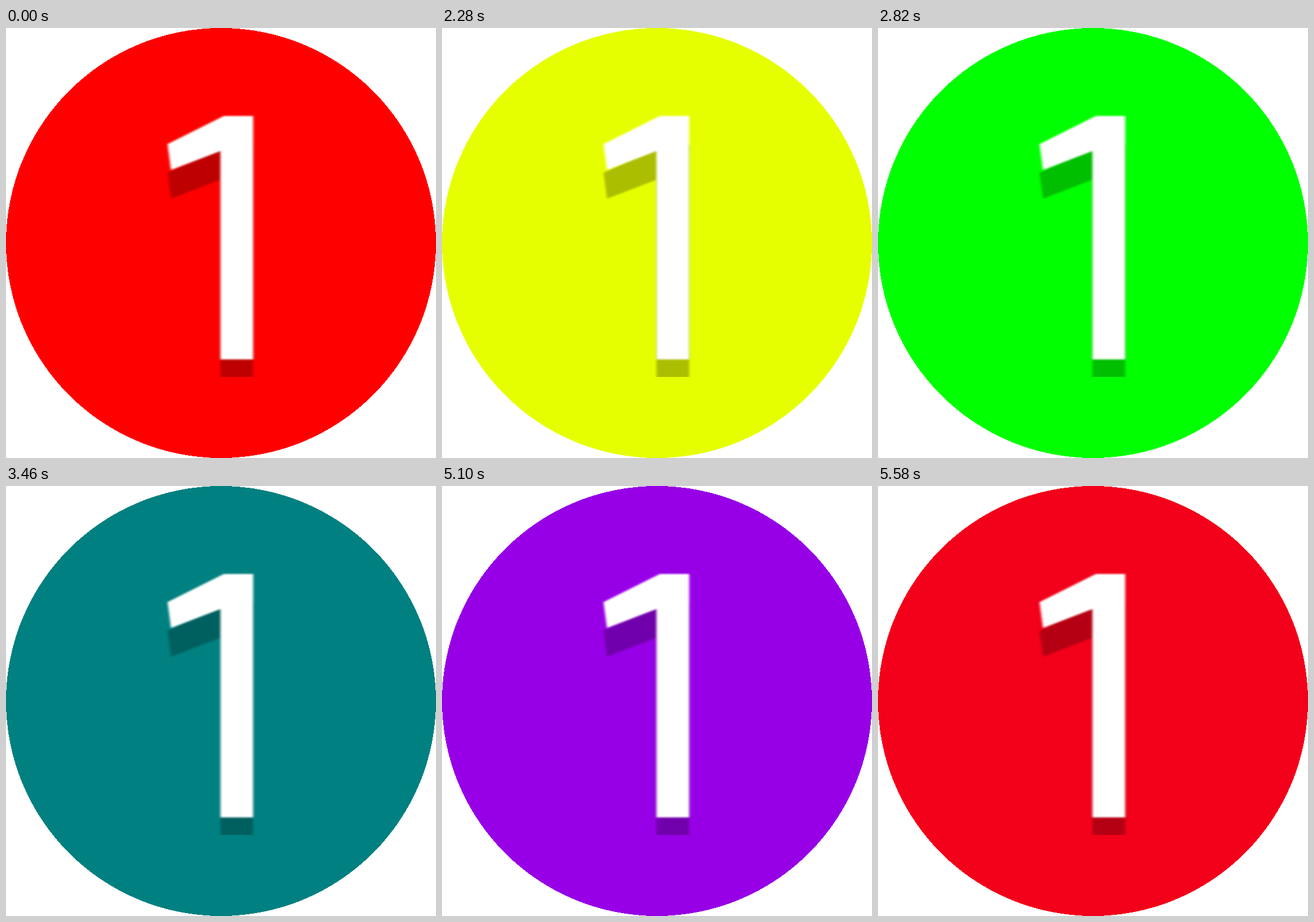
Animation of 748x748 px, one loop 5.64 s. Source, as an HTML page:

```html
<!DOCTYPE html>
<html lang="en">
<head>
<meta charset="utf-8">
<title>Colour cycling badge</title>
<style>
  html, body { margin: 0; width: 100%; height: 100%; overflow: hidden; background: #fff; }
  svg { display: block; width: 100%; height: 100%; }
</style>
</head>
<body>
<svg viewBox="0 0 748 748" role="img" aria-label="1">
  <defs>
    <path id="one" d="M281 202 L379 153 H430 V576.5 H373 V214 L287 247 Z"/>
    <filter id="soft" filterUnits="userSpaceOnUse" x="240" y="120" width="240" height="540">
      <feGaussianBlur stdDeviation="2.2 1.5"/>
    </filter>
    <clipPath id="cut"><rect width="748" height="607"/></clipPath>
  </defs>
  <circle id="disc" cx="374" cy="374" r="374" fill="#f00" shape-rendering="crispEdges"/>
  <g clip-path="url(#cut)" opacity=".25">
    <use href="#one" y="50" filter="url(#soft)"/>
  </g>
  <use href="#one" fill="#fff" filter="url(#soft)"/>
</svg>
<script>
  const HOLD = 400, STEP = 60, STEPS = 10;
  const SPAN = HOLD + STEP * (STEPS - 1);
  const COLORS = [
    [255, 0, 0], [255, 127, 0], [255, 255, 0],
    [0, 255, 0], [0, 0, 255], [139, 0, 255]
  ];
  const LOOP = SPAN * COLORS.length;
  const disc = document.getElementById('disc');

  // Each colour holds, then moves to the next one in even steps.
  function colorAt(time) {
    const t = time % LOOP;
    const i = Math.floor(t / SPAN);
    const local = t - i * SPAN;
    const mix = local < HOLD ? 0 : (Math.floor((local - HOLD) / STEP) + 1) / STEPS;
    const next = COLORS[(i + 1) % COLORS.length];
    return COLORS[i].map((c, k) => Math.round(c + (next[k] - c) * mix));
  }

  function draw() {
    disc.setAttribute('fill', `rgb(${colorAt(performance.now())})`);
    requestAnimationFrame(draw);
  }
  draw();
</script>
</body>
</html>
```
